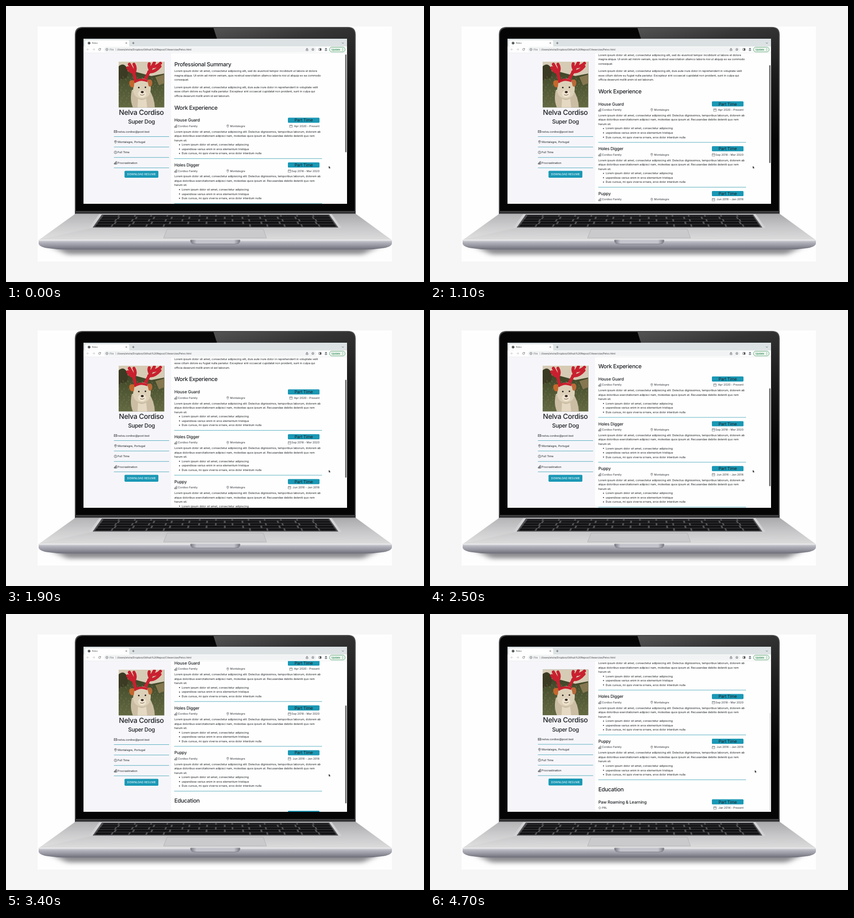
These frames come from a looping animation (820 px wide and 540 px high, 4.8 s). An HTML page:

```html
<!DOCTYPE html>
<html lang="en">
<head>
<meta charset="utf-8">
<title>Resume on a laptop</title>
<style>
html, body { margin: 0; width: 100%; height: 100%; overflow: hidden; background: #f6f6f6; }
svg { display: block; width: 820px; height: 540px; }
text { font-family: Inter, "Open Sans", sans-serif; text-rendering: geometricPrecision; white-space: pre; }
</style>
</head>
<body>
<svg id="stage" viewBox="0 0 820 540" xmlns="http://www.w3.org/2000/svg">
  <defs>
    <linearGradient id="gloss" gradientUnits="userSpaceOnUse" x1="430" y1="42" x2="500" y2="310">
      <stop offset="0" stop-color="#505050"/><stop offset=".2" stop-color="#343434"/>
      <stop offset=".55" stop-color="#1c1c1c"/><stop offset="1" stop-color="#050505"/>
    </linearGradient>
    <linearGradient id="deck" x1="0" y1="0" x2="0" y2="1">
      <stop offset="0" stop-color="#a9a9ab"/><stop offset=".5" stop-color="#c6c6c8"/><stop offset="1" stop-color="#dcdcdd"/>
    </linearGradient>
    <linearGradient id="lip" x1="0" y1="0" x2="0" y2="1">
      <stop offset="0" stop-color="#e4e4e8"/><stop offset=".25" stop-color="#b4b5bd"/>
      <stop offset=".6" stop-color="#9596a0"/><stop offset="1" stop-color="#6d6e78"/>
    </linearGradient>
    <linearGradient id="notch" x1="0" y1="0" x2="1" y2="0">
      <stop offset="0" stop-color="#777882"/><stop offset=".12" stop-color="#c3c4cb"/>
      <stop offset=".88" stop-color="#c3c4cb"/><stop offset="1" stop-color="#777882"/>
    </linearGradient>
    <linearGradient id="lawn" x1="0" y1="0" x2="0" y2="1">
      <stop offset="0" stop-color="#34371f"/><stop offset=".45" stop-color="#4b5230"/><stop offset="1" stop-color="#646a42"/>
    </linearGradient>
    <filter id="blur" x="-10%" y="-100%" width="120%" height="300%"><feGaussianBlur stdDeviation="7 4"/></filter>
    <filter id="soft"><feGaussianBlur stdDeviation=".7"/></filter>
    <clipPath id="screen"><path d="M152 64H669V387H152Z"/></clipPath>
    <clipPath id="page"><path d="M152 91.5H669V387H152Z"/></clipPath>
    <clipPath id="photo"><path d="M221 109h89.5v89.5h-89.5z"/></clipPath>
    <clipPath id="card"><path d="M62 40H757V500H62Z"/></clipPath>
  </defs>
  <g id="laptop" clip-path="url(#card)"></g>
  <g clip-path="url(#page)">
    <path d="M152 91H669V387H152Z" fill="#fefefe"/>
    <path d="M152 91H324V387H152Z" fill="#f6f6fa"/>
    <g id="content"></g>
    <g id="profile"></g>
    <rect id="thumb" x="665.4" width="2.5" height="191.5" rx="1.2" fill="#626264"/>
  </g>
  <g id="browser" clip-path="url(#screen)"></g>
  <path id="cursor" d="M0 0V5.2L1.2 4.1L2 5.9L2.9 5.5L2.1 3.8H3.7Z" fill="#111" stroke="#fff" stroke-width=".35"/>
</svg>
<script>
const $ = id => document.getElementById(id);
const INK = '#1d2024', TEAL = '#1a98b5', GREY = '#505358';
const lerp = (a, b, k) => a + (b - a) * k;
const clamp = k => Math.min(1, Math.max(0, k));

const text = (x, y, string, { size = 5.5, weight = 400, fill = INK, anchor = 'start', track = -.004 } = {}) =>
  `<text x="${x}" y="${y}" font-size="${size}" font-weight="${weight}" fill="${fill}" text-anchor="${anchor}"
    letter-spacing="${(track * size).toFixed(3)}">${string}</text>`;
const fill = (d, color, extra = '') => `<path d="${d}" fill="${color}" ${extra}/>`;
const line = (d, color = INK, width = .6, extra = '') =>
  `<path d="${d}" fill="none" stroke="${color}" stroke-width="${width}" ${extra}/>`;
const box = (x, y, w, h, color, rx = 0, extra = '') =>
  `<rect x="${x}" y="${y}" width="${w}" height="${h}" rx="${rx}" fill="${color}" ${extra}/>`;
const disc = (x, y, rx, ry, color) => `<ellipse cx="${x}" cy="${y}" rx="${rx}" ry="${ry}" fill="${color}"/>`;

// Icons are centred on x, y
const glyphs = {
  mail: 'M-2.7-2H2.7V2H-2.7ZM-2.7-1.8L0 .4L2.7-1.8M-2.7 1.9L-.8-.2M2.7 1.9L.8-.2',
  pin: 'M0 2.8C-1.4 1-2.1 0-2.1-.8A2.1 2.1 0 0 1 2.1-.8C2.1 0 1.4 1 0 2.8ZM-.8-.8a.8.8 0 1 0 1.6 0a.8.8 0 1 0-1.6 0',
  clock: 'M-2.6 0a2.6 2.6 0 1 0 5.2 0a2.6 2.6 0 1 0-5.2 0M0-1.7V.2L1.2.9',
  bars: 'M-2.6 2.6V.6H-1V2.6ZM-1 2.6V-.9H.8V2.6ZM.8 2.6V-2.6H2.5V2.6Z',
  calendar: 'M-2.6-1.9H2.6V2.6H-2.6ZM-2.6-.7H2.6M-1.5-2.7V-1.6M1.5-2.7V-1.6',
  compass: 'M0-2.6L.9-.9L2.6 0L.9.9L0 2.6L-.9.9L-2.6 0L-.9-.9Z',
};
const icon = (name, x, y, color = INK) => line(glyphs[name], color, .55, `transform="translate(${x} ${y})"`);

function drawLaptop() {
  const keyPoint = (u, v) => `${(lerp(190, 172, v) + u * lerp(444, 478, v)).toFixed(1)} ${(409.5 + 23 * v).toFixed(1)}`;
  const key = (u0, u1, v0, v1) => fill(`M${keyPoint(u0, v0)}L${keyPoint(u1, v0)}L${keyPoint(u1, v1)}L${keyPoint(u0, v1)}Z`, '#121214');
  let keys = '';
  [0, .13, .34, .55, .77].forEach((top, row, tops) => {
    const bottom = (tops[row + 1] ?? 1) - .035;
    const count = 14 - row % 2;
    for (let i = 0; i < count; i++) {
      if (row === 4 && i > 3 && i < 9) continue;
      keys += key((i + .05) / count, (i + .95) / count, top, bottom);
    }
    if (row === 4) keys += key(4.05 / count, 8.95 / count, top, bottom);
  });
  return box(62, 40, 695, 460, '#fefefe') +
    `<g filter="url(#blur)">${fill('M85 468H736L700 486H120Z', '#8c8c90')}</g>` +
    fill('M135 407V56Q135 41 150 41H671Q686 41 686 56V407Z', '#4b4b4d') +
    fill('M137 403V57Q137 43 151 43H670Q684 43 684 57V403Z', '#050505') +
    fill('M407 43H670Q684 43 684 57V330H500Z', 'url(#gloss)') +
    fill('M136 401H685V408H136Z', '#303032') + line('M137 402.2H684', '#5c5c5e', .7) +
    fill('M136 406.5H686L757 458H64Z', 'url(#deck)') +
    fill('M136 406.5H190L170 434L64 457Z', '#fff', 'opacity=".12"') +
    line('M136 406.5H686', '#858588', .8) +
    fill('M183 407H639L658 434H163Z', '#d2d2d4') +
    fill('M188 408H634L652 433.5H170Z', '#505054') + keys +
    fill('M316 436.5H505L511 454H309Z', '#cacacc') + line('M316 436.5H505L511 454H309Z', '#aaaaad', .7) +
    fill('M64 457.5H757V465Q755 472 738 474Q720 476.5 700 476.5H121Q101 476.5 83 474Q66 472 64 465Z', 'url(#lip)') +
    line('M64 458H757', '#f2f2f4', 1) +
    fill('M362 457.5H459V460Q458 465.5 450 465.5H371Q363 465.5 362 460Z', 'url(#notch)') +
    line('M362 458V460Q363 465.5 371 465.5H450Q458 465.5 459 460V458', '#73747e', .8) +
    box(152, 64, 517, 323, '#fefefe');
}

function drawBrowser() {
  const tool = '#55585c', url = { size: 4.85, fill: '#33363a', track: 0 };
  const nav = (x, d, color) => line(d, color, .7, `transform="translate(${x} 85)"`);
  return box(152, 64, 517, 15.5, '#dce2e3') +
    fill('M153 79.5Q155 79.5 155 77.5V69Q155 67 157 67H239.5Q241.5 67 241.5 69V77.5Q241.5 79.5 243.5 79.5Z', '#fefefe') +
    disc(163, 72.4, 2.5, 2.5, '#34373b') + line('M161.4 71.2L163.2 72.2L162.6 74.2M163.5 70.5L165 71.8', '#e8e8e8', .6) +
    text(168.5, 74, 'Pelvo', { size: 4.4, fill: '#3c4043' }) +
    line('M234.7 71.2L237.3 73.8M237.3 71.2L234.7 73.8M247.5 72.5H252M249.75 70.2V74.8M659.2 71.7L660.8 73.3L662.4 71.7', '#3d4044', .7) +
    box(152, 79.3, 517, 12.6, '#fefefe') + line('M152 91.8H669', '#dfe1e4', .6) +
    box(192, 80.3, 417, 9.8, '#f1f3f4', 4.9) +
    nav(160.5, 'M2.3 0H-2M0-2L-2 0L0 2', '#b5b8bb') + nav(172, 'M-2.3 0H2M0-2L2 0L0 2', '#b5b8bb') +
    nav(183.7, 'M1.9-.9A2.1 2.1 0 1 0 2 .7M2.1-2.3V-.6H.4', tool) +
    nav(198, 'M-2.2 0a2.2 2.2 0 1 0 4.4 0a2.2 2.2 0 1 0-4.4 0M0-.2V1.2M0-1.2V-.7', tool) +
    text(203.3, 86.8, 'File', { ...url, fill: '#5f6368' }) + line('M215.5 82.5V87.5', '#9a9da1', .5) +
    text(218, 86.8, '/Users/elvira/Dropbox/Github%20Repos/CVexercise/Pelvo.html', url) +
    nav(590.5, 'M-.8-.7H-1.8V2.3H1.8V-.7H.8M0 .8V-2.4M-1-1.5L0-2.5L1-1.5', tool) +
    nav(602, 'M0-2.4L.7-.8L2.4-.7L1.1.4L1.5 2.1L0 1.2L-1.5 2.1L-1.1.4L-2.4-.7L-.7-.8Z', tool) +
    nav(616, 'M-2.1-2H2.1V2H-2.1Z', '#33363a') + box(616.1, 83, 2, 4, '#33363a') +
    disc(627.7, 85, 3.4, 3.4, '#e3e6ea') + disc(627.7, 83.8, 1.2, 1.2, '#46494d') + fill('M625.3 87.5Q627.7 84.3 630.1 87.5Z', '#46494d') +
    box(634.4, 80.5, 31, 9.4, '#eaf4ed', 4.7, 'stroke="#3b9158" stroke-width=".7"') +
    text(638.6, 86.8, 'Update', { size: 4.9, weight: 500, fill: '#23804a' }) +
    [83.2, 85.1, 87].map(y => disc(660.6, y, .5, .5, '#23804a')).join('');
}

function drawPhoto() {
  let tufts = '';
  for (let i = 0; i < 90; i++) {
    const x = 221 + i * 37.7 % 89.5, y = 140 + i * 23.3 % 58;
    tufts += `M${x.toFixed(1)} ${y.toFixed(1)}l${(i % 5 - 2) * .8} -3`;
  }
  const antlers = line('M254 147Q252 129 242 114M249 130Q243 128 239 121M251 131Q256 122 251 114' +
    'M273 143Q281 128 291 111M280 129Q292 130 302 118M286 119Q296 119 303 112M284 126Q279 119 281 113',
    '#c9202f', 6, 'stroke-linecap="round" stroke-linejoin="round"');
  return `<g clip-path="url(#photo)">${box(221, 109, 90, 90, 'url(#lawn)')}<g filter="url(#soft)">` +
    fill('M221 109H311V132L285 137L255 129L221 126Z', '#d6cbb5') +
    fill('M221 118Q230 110 237 120Q241 128 237 140L221 145Z', '#3b3a22') +
    fill('M293 139L311 134V151L300 155Z', '#85774f') +
    line(tufts, '#858660', .7) + antlers +
    fill('M247 164Q242 182 249 199H292Q291 178 281 164Z', '#cbbda4') +
    fill('M251 152Q258 140 270 142Q284 145 284 161Q284 179 268 181Q251 181 249 165Z', '#ddd0b8') +
    fill('M252 146Q240 143 242 153Q245 162 251 158Z', '#c4672c') +
    fill('M277 145Q287 141 287 151Q286 160 280 157Z', '#ba6a39') +
    fill('M251 147Q264 138 278 145L277 149Q264 143 253 151Z', '#c9202f') +
    disc(267, 172, 8, 7, '#eee3ce') + fill('M259 181Q266 187 275 181L277 199H258Z', '#e5d9c3') +
    disc(260.5, 159.5, 1.6, 1.5, '#292019') + disc(273.5, 159, 1.6, 1.5, '#292019') +
    disc(267.3, 168.3, 2.8, 2.1, '#2b221d') + line('M263 173.5Q267 176 271.5 173', '#6f5846', .9) +
    '</g></g>';
}

function drawProfile() {
  const rows = [['mail', 'nelva.cordiso@post.test'], ['pin', 'Montalegre, Portugal'], ['clock', 'Full Time'], ['bars', 'Procrastination']];
  return drawPhoto() +
    text(265.6, 212.9, 'Nelva Cordiso', { size: 13.75, weight: 500, anchor: 'middle', track: -.025 }) +
    text(265.7, 230, 'Super Dog', { size: 11, weight: 500, anchor: 'middle', track: -.03 }) +
    rows.map(([name, label], i) => {
      const y = 245.6 + i * 20.4;
      return icon(name, 214.8, y) + text(219, y + 1.9, label) + line(`M211.7 ${y + 9.9}H320`, '#359eb3', .8);
    }).join('') +
    box(232.5, 322.5, 66.4, 13.6, TEAL, 1.8) +
    text(265.7, 331.3, 'DOWNLOAD RESUME', { fill: '#fff', anchor: 'middle' });
}

const paragraph = (y, lines, x = 330.2) => lines.map((s, i) => text(x, y + i * 8.53, s)).join('');
const heading = (y, s) => text(330.2, y, s, { size: 11, weight: 500, track: -.03 });

function entryHead(y, title, dates) {
  const label = { weight: 500, fill: GREY, anchor: 'end' };
  const dateWidth = dates.length * 2.9;
  return text(330.2, y + 3, title, { size: 8.25, weight: 500, track: -.018 }) +
    box(553, y - 5, 62, 10, TEAL, 1.6) +
    text(584, y + 3, 'Part Time', { size: 8.25, anchor: 'middle', track: -.02 }) +
    text(615, y + 13.4, dates, label) + icon('calendar', 611.2 - dateWidth, y + 11.7, GREY);
}

function job(y, title, dates) {
  const label = { weight: 500, fill: GREY };
  const bullets = ['Lorem ipsum dolor sit amet, consectetur adipiscing', 'uspendisse varius enim in eros elementum tristique',
    'Duis cursus, mi quis viverra ornare, eros dolor interdum nulla'];
  return entryHead(y, title, dates) +
    icon('bars', 333, y + 11.7, GREY) + text(337.2, y + 13.4, 'Cordiso Family', label) +
    icon('pin', 435, y + 11.7, GREY) + text(439.4, y + 13.4, 'Montalegre', label) +
    paragraph(y + 24.3, ['Lorem ipsum dolor sit amet, consectetur adipisicing elit. Delectus dignissimos, temporibus laborum, dolorem ab',
      'atque doloribus exercitationem adipisci nam, molestias quos ipsum at. Recusandae debitis deleniti quo rem', 'harum sit.']) +
    paragraph(y + 49.9, bullets, 344.5) +
    bullets.map((_, i) => disc(340.4, y + 48.1 + i * 8.53, 1, 1, INK)).join('') +
    line(`M330 ${y + 75.2}H620`, '#359eb3', .8);
}

function drawContent() {
  return heading(117.5, 'Professional Summary') +
    paragraph(129.4, ['Lorem ipsum dolor sit amet, consectetur adipiscing elit, sed do eiusmod tempor incididunt ut labore et dolore',
      'magna aliqua. Ut enim ad minim veniam, quis nostrud exercitation ullamco laboris nisi ut aliquip ex ea commodo', 'consequat.']) +
    paragraph(160.9, ['Lorem ipsum dolor sit amet, consectetur adipiscing elit, duis aute irure dolor in reprehenderit in voluptate velit',
      'esse cillum dolore eu fugiat nulla pariatur. Excepteur sint occaecat cupidatat non proident, sunt in culpa qui',
      'officia deserunt mollit anim id est laborum.']) +
    heading(202.6, 'Work Experience') +
    job(223.4, 'House Guard', 'Apr 2020 - Present') +
    job(311.1, 'Holes Digger', 'Sep 2018 - Mar 2020') +
    job(398.8, 'Puppy', 'Jun 2016 - Jan 2018') +
    heading(496.6, 'Education') +
    entryHead(517.3, 'Paw Roaming &amp; Learning', 'Jan 2014 - Present') +
    icon('compass', 333, 529, GREY) + text(337.2, 530.7, 'PRL', { weight: 500, fill: GREY });
}

$('laptop').innerHTML = drawLaptop();
$('browser').innerHTML = drawBrowser();
$('profile').innerHTML = drawProfile();
$('content').innerHTML = drawContent();

const LOOP = 4800, STEP = 100;
const scrollKeys = [[0, 0], [300, 5], [400, 5], [1100, 31.8], [1600, 54], [1700, 54], [1900, 63.1],
  [2500, 88.5], [3400, 127.4], [4000, 149.2], [4800, 149.2]];

function scrollAt(t) {
  const i = scrollKeys.findIndex(key => key[0] > t);
  const [t0, y0] = scrollKeys[i - 1], [t1, y1] = scrollKeys[i];
  return lerp(y0, y1, (t - t0) / (t1 - t0));
}

function render(now) {
  const t = Math.floor(now % LOOP / STEP) * STEP;
  const scroll = scrollAt(t), settle = t >= 4100 ? .5 : 0;
  $('content').setAttribute('transform', `translate(0 ${-scroll - settle})`);
  $('profile').setAttribute('transform', `translate(0 ${-settle})`);
  const fade = clamp((t - 4400) / 300), thumb = $('thumb');
  thumb.setAttribute('y', 94.8 + scroll * .66);
  thumb.setAttribute('x', lerp(665.4, 666.4, fade));
  thumb.setAttribute('width', lerp(2.5, 1.2, fade));
  thumb.setAttribute('opacity', lerp(1, .3, fade));
  const k = clamp((t - 4200) / 400), move = k * k * (3 - 2 * k);
  $('cursor').setAttribute('transform', `translate(${lerp(633.1, 637.1, move)} ${lerp(312.8, 305.3, move)})`);
}

const start = performance.now();
function tick() {
  render(performance.now() - start);
  requestAnimationFrame(tick);
}
tick();
</script>
</body>
</html>
```
